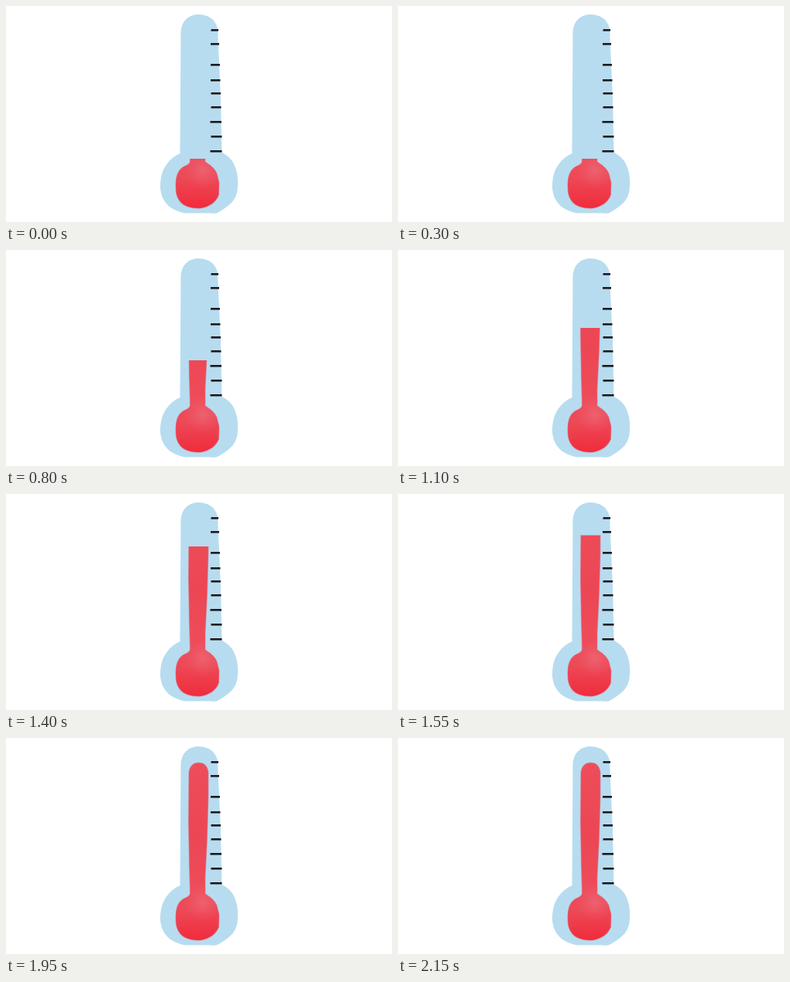
Write an HTML page with a canvas that moves like this. It is 498 by 280 pixels and loops after 2.2 s.

```html
<!DOCTYPE html>
<html lang="en">
<head>
<meta charset="utf-8">
<title>Thermometer</title>
<style>
html, body { margin: 0; width: 498px; height: 280px; overflow: hidden; background: #fff; }
canvas { display: block; }
</style>
</head>
<body>
<canvas id="stage" width="498" height="280"></canvas>
<script>
const ctx = document.getElementById('stage').getContext('2d');
const LOOP = 2200, STEP = 50;

const glass = new Path2D(
  'M225.5 35 C226 20 235 11 248 11 C261 11 270 17 273 29 L275 75 L277 120 L278.5 190 ' +
  'C286 194 292 199 295 207 C299 216 300 228 298.5 239 C297 251 289 258 281 263 ' +
  'C275 267 271 270 264 268.5 L230 268.5 C221 266 212 263 206 255 ' +
  'C200 247 198 237 199.5 226 C201 212 209 198 224.5 191 L225 120 Z');

const fluid = new Path2D(
  'M236 45 C237 36 242 32 248.5 32 C256 32 260 36 261 45 L261 75 L259.5 130 L257 180 L257 202 ' +
  'C262 205 269 210 272 217 L275 229 L274.5 245 C271 254 263 260 252 262 ' +
  'C241 263 230 260 225 254 C219 247 219 239 219 231 C219 221 222 213 228 209 ' +
  'C233 206 237 206 237.5 201 L236.5 165 L235.5 110 Z');

// y, left, right
const ticks = [
  [31, 264.5, 274], [49, 264, 275], [76, 264, 276], [96, 264, 276.5], [113, 264.5, 277],
  [131, 264.5, 277.5], [150, 263.5, 278], [169, 264.5, 278.5], [188, 263.5, 278.5]
];

// time, top of the fluid
const rise = [
  [0, 198], [300, 198], [450, 194], [800, 143], [1100, 101],
  [1400, 68], [1750, 38], [1950, 30], [2200, 30]
];

function slope(i) {
  if (i === 0 || i === rise.length - 1) return 0;
  const [a, b, c] = [rise[i - 1], rise[i], rise[i + 1]];
  const before = (b[1] - a[1]) / (b[0] - a[0]);
  const after = (c[1] - b[1]) / (c[0] - b[0]);
  return before * after > 0 ? 2 * before * after / (before + after) : 0;
}

function level(t) {
  let i = 0;
  while (i < rise.length - 2 && t >= rise[i + 1][0]) i++;
  const [t0, y0] = rise[i], [t1, y1] = rise[i + 1];
  const d = t1 - t0, u = (t - t0) / d, v = 1 - u;
  return v * v * (1 + 2 * u) * y0 + u * u * (3 - 2 * u) * y1
    + d * u * v * (v * slope(i) - u * slope(i + 1));
}

function gradient(g, stops) {
  stops.forEach(([at, color]) => g.addColorStop(at, color));
  return g;
}

const red = gradient(ctx.createLinearGradient(0, 32, 0, 262), [
  [0, '#ee4d5b'], [0.4, '#ec4654'], [0.7, '#ee4c5a'], [0.82, '#ed4a58'], [1, '#f02c3c']
]);
const wash = gradient(ctx.createRadialGradient(254, 213, 1, 254, 213, 24), [
  [0, 'rgba(238,130,145,.4)'], [1, 'rgba(238,110,125,0)']
]);

function draw(t) {
  ctx.fillStyle = '#fff';
  ctx.fillRect(0, 0, 498, 280);
  ctx.fillStyle = '#b7dcf0';
  ctx.fill(glass);

  ctx.save();
  ctx.beginPath();
  ctx.rect(210, level(t), 75, 280);
  ctx.clip();
  ctx.fillStyle = red;
  ctx.fill(fluid);
  ctx.fillStyle = wash;
  ctx.fill(fluid);
  ctx.strokeStyle = 'rgba(222,110,130,.5)';
  ctx.lineWidth = 1.2;
  ctx.stroke(fluid);
  ctx.restore();

  ctx.strokeStyle = '#1d191c';
  ctx.lineWidth = 2.6;
  for (const [y, left, right] of ticks) {
    ctx.beginPath();
    ctx.moveTo(left, y + 0.3);
    ctx.lineTo(right, y + 0.3);
    ctx.stroke();
  }
}

const start = performance.now();
function frame() {
  const t = (performance.now() - start) % LOOP;
  draw(Math.floor(t / STEP) * STEP);
  requestAnimationFrame(frame);
}
frame();
</script>
</body>
</html>
```
